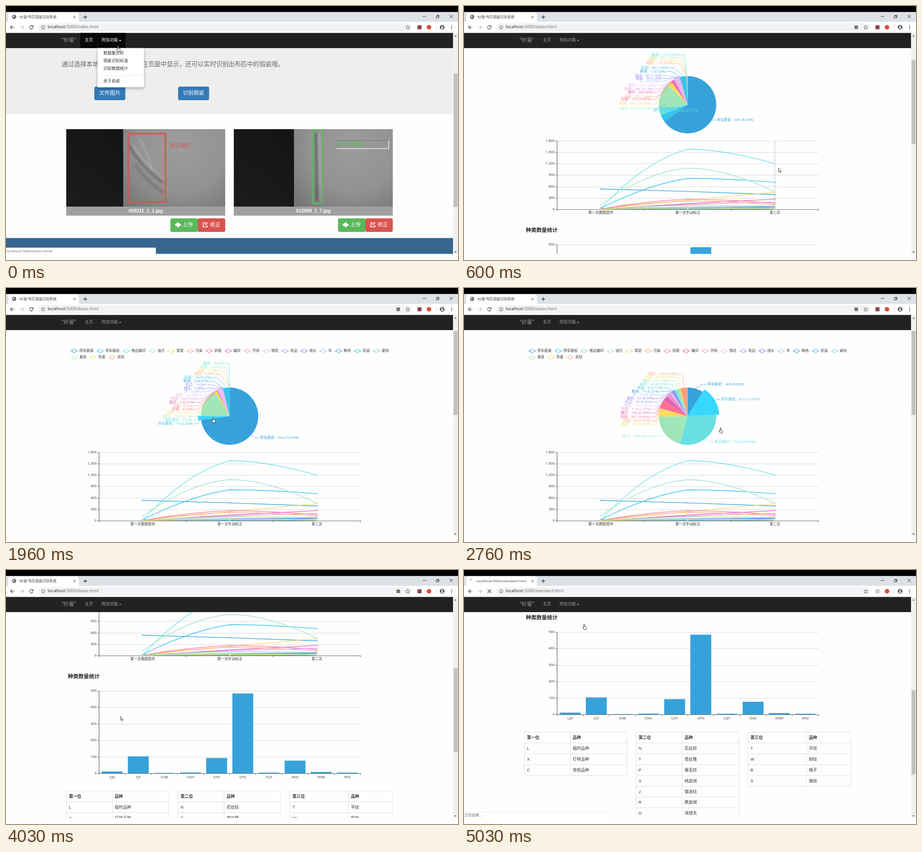
These frames come from a looping animation (998x561 px, 5.06 s). An HTML page with a canvas:

```html
<!DOCTYPE html>
<html lang="zh-CN">
<head>
<meta charset="utf-8">
<style>
html, body { margin: 0; width: 998px; height: 561px; overflow: hidden; background: #fefefe; }
canvas { display: block; }
</style>
</head>
<body>
<canvas id="stage" width="998" height="561"></canvas>
<script>
const g = document.getElementById('stage').getContext('2d');
const LOOP = 5060, K = .65, TAU = Math.PI * 2;
const UI = "'Open Sans','Noto Sans CJK SC',sans-serif";
const ARIAL = "'Liberation Sans','Noto Sans CJK SC',sans-serif";
const BRAND = '“纱鉴”';

// ---------- data ----------
const names = '停车痕紧 停车痕松 卷边皱印 油污 浆斑 污染 折痕 皱印 开纬 错花 毛边 线头 字 断纬 折返 紧纬 紧经 色差 花纹'.split(' ');
const rounds = [
  [534, 17, 0, 118, 9, 0, 0, 2, 4, 22, 0, 0, 0, 3, 24, 0, 0, 0, 0],
  [468, 812, 1583, 1081, 238, 22, 261, 146, 119, 57, 45, 31, 17, 11, 6, 45, 98, 26, 216],
  [385, 710, 1200, 452, 445, 77, 153, 265, 185, 73, 60, 53, 44, 1, 88, 19, 81, 11, 115]];
const palette = '37A2DA 32C5E9 67E0E3 9FE6B8 FFDB5C FF9F7F FB7293 E062AE E690D1 E7BCF3 9D96F5 8378EA 96BFFF'.split(' ');
const color = i => '#' + palette[i % 13];
const lift = i => 'rgb(' + palette[i % 13].match(/../g).map(h => Math.min(255, parseInt(h, 16) * 1.1 | 0)) + ')';
const bars = { CJD: 11, CJT: 103, CNB: 2, CNH: 5, CNT: 93, CPD: 484, CQT: 4, XND: 77, XNW: 8, XPD: 4 };
const tables = [
  [133.5, 234.5, 360, '第一位 品种 L 临时品种 X 打样品种 C 常规品种'],
  [380, 481.5, 607, '第二位 品种 N 尼丝纺 T 塔丝隆 P 春亚纺 S 桃皮绒 J 锦涤纺 R 麂皮绒 D 涤塔夫'],
  [627, 756, 854, '第三位 品种 T 平纹 W 斜纹 B 格子 S 缎纹']];

// ---------- timeline ----------
const pieSteps = [[-1e4, 0], [592.6, 2], [1180, 1], [1420, 0], [2135, 1], [2900, 2]];
const hovers = [[1, 1860, 2070], [1, 2540, 2790], [2, 3230, 3480]];
const scrollKeys = [[430, -65], [480, 0], [510, 0], [560, 65], [920, 65], [1030, 0], [3540, 0], [3660, 65],
  [3740, 130], [3950, 325], [4320, 325], [4450, 455]];
// time, x, y, hand
const mouseKeys = [[0, 248, 95, 1], [90, 240, 106, 1], [260, 240, 106, 1], [300, 260, 120, 0], [530, 690, 285, 0],
  [600, 697, 363, 0], [1060, 700, 400, 0], [1180, 590, 410, 0], [1420, 397, 430, 0], [1600, 330, 400, 0],
  [1860, 446, 300, 1], [1960, 458, 292, 1], [2070, 463, 300, 0], [2135, 490, 365, 0], [2250, 510, 400, 0],
  [2540, 535, 300, 1], [2640, 540, 270, 1], [2760, 567, 315, 1], [2820, 580, 365, 0], [2900, 592, 400, 0],
  [3050, 640, 400, 0], [3230, 545, 335, 1], [3360, 515, 313, 1], [3480, 500, 314, 0], [3760, 300, 330, 0],
  [4030, 255, 328, 0], [4400, 255, 328, 0], [4520, 236, 78, 1], [4600, 240, 85, 1], [4700, 262, 122, 1], [4850, 266, 126, 1]];

const clamp = v => Math.max(0, Math.min(1, v));
const lerp = (a, b, p) => a + (b - a) * p;
const easeOut = p => 1 - (1 - clamp(p)) ** 3;
function track(keys, t) {
  let i = keys.findIndex(k => k[0] > t);
  if (i == 0) return keys[0];
  if (i < 0) return keys[keys.length - 1];
  const a = keys[i - 1], b = keys[i], p = (t - a[0]) / (b[0] - a[0]), e = p * p * (3 - 2 * p);
  return a.map((v, j) => j == 3 ? v : lerp(v, b[j], e));
}

// ---------- drawing helpers ----------
function text(s, x, y, size, fill, align = 'left', style = '', font = UI) {
  g.font = `${style} ${size}px ${font}`;
  g.textAlign = align;
  g.textBaseline = 'middle';
  g.fillStyle = fill;
  g.fillText(s, x, y);
}
function rect(x, y, x2, y2, fill, r = 0) {
  g.fillStyle = fill;
  g.beginPath();
  g.roundRect(x, y, x2 - x, y2 - y, r);
  g.fill();
}
function line(pts, stroke, w = 1) {
  g.strokeStyle = stroke;
  g.lineWidth = w;
  g.beginPath();
  pts.forEach(p => g.lineTo(...p));
  g.stroke();
}
function circle(x, y, r, fill, stroke, w = 1, a = 0, b = TAU) {
  g.beginPath();
  g.arc(x, y, r, a, b);
  if (fill) { g.fillStyle = fill; g.fill(); }
  if (stroke) { g.strokeStyle = stroke; g.lineWidth = w; g.stroke(); }
}
function shape(d, x, y, fill, stroke, w = 1) {
  const p = new Path2D(d);
  g.save();
  g.translate(x, y);
  if (fill) { g.fillStyle = fill; g.fill(p); }
  if (stroke) { g.strokeStyle = stroke; g.lineWidth = w; g.stroke(p); }
  g.restore();
}
function stops(gradient, ...colors) {
  colors.forEach((c, i) => gradient.addColorStop(i / (colors.length - 1), c));
  return gradient;
}

// ---------- pie ----------
const CX = 493.6, CY = 283, R = 97.5 * K, LEG = 15 * K, LH = 12 * K;

// Slice angles plus labels spread apart so that none overlap.
function layout(vals) {
  const sum = vals.reduce((a, b) => a + b);
  let acc = 0;
  const items = vals.map(v => {
    const a0 = acc / sum * TAU, a1 = (acc += v) / sum * TAU, m = (a0 + a1) / 2;
    const d = m > 3.14 ? -1 : 1, sx = Math.sin(m), sy = -Math.cos(m);
    return { a0, a1, d, x1: sx * R, y1: sy * R, x: sx * (R + LEG) + d * (LEG + 5 * K), y: sy * (R + LEG) };
  });
  for (const d of [-1, 1]) spread(items.filter(o => o.d == d).sort((a, b) => a.y - b.y));
  return items;
}
function spread(list) {
  const up = (end, dy) => {
    for (let j = end; j >= 0; j--) {
      list[j].y -= dy;
      if (j > 0 && list[j].y > list[j - 1].y + LH) break;
    }
  };
  const down = (start, dy) => {
    for (let j = start; j < list.length; j++) {
      list[j].y += dy;
      if (j > start && j + 1 < list.length && list[j + 1].y > list[j].y + LH) return up(j, dy / 2);
    }
    up(list.length - 1, dy / 2);
  };
  let last = -1e9;
  list.forEach((o, i) => {
    if (o.y < last) down(i, last - o.y);
    last = o.y + LH;
  });
  let above = 0, below = 1e9;
  for (const o of list) {
    const dy = Math.abs(o.y);
    let dx = dy < R + LEG ? Math.sqrt((R + 2 * LEG) ** 2 - dy * dy) : Math.abs(o.x);
    if (o.y >= 0) below = dx = dx >= below ? below - 10 * K : dx;
    else above = dx = dx <= above ? above + 10 * K : dx;
    o.x = dx * o.d;
  }
}
const layouts = rounds.map(layout);
const sums = rounds.map(v => v.reduce((a, b) => a + b));

function drawPie(t) {
  const n = pieSteps.findLastIndex(s => s[0] <= t), now = pieSteps[n][1];
  const from = layouts[pieSteps[Math.max(0, n - 1)][1]], to = layouts[now];
  const p = easeOut((t - pieSteps[n][0]) / 200), intro = easeOut((t - 320) / 200);
  g.save();
  g.translate(CX, CY);
  to.forEach((o, i) => {
    const mix = k => lerp(from[i][k], o[k], p);
    const h = hovers.find(h => h[0] == i && t >= h[1] && t < h[2] + 60);
    const e = h ? Math.min(easeOut((t - h[1]) / 80), 1 - clamp((t - h[2]) / 60)) : 0;
    g.fillStyle = e > .3 ? lift(i) : color(i);
    g.beginPath();
    g.moveTo(0, 0);
    g.arc(0, 0, R + 6.5 * e, mix('a0') * intro - TAU / 4, mix('a1') * intro - TAU / 4);
    g.fill();
  });
  if (intro > .9) to.forEach((o, i) => {
    const mix = k => lerp(from[i][k], o[k], p), x = mix('x'), y = mix('y');
    const end = x - o.d * 3 * K, v = rounds[now][i];
    line([[mix('x1'), mix('y1')], [end - o.d * LEG, y], [end, y]], color(i), .8);
    text(`${names[i]}：${v} (${+(v / sums[now] * 100).toFixed(2)}%)`, x, y, 7.8, color(i), o.d < 0 ? 'right' : 'left');
  });
  g.restore();
}

// ---------- charts ----------
const X0 = 205.5, X1 = 782.5;
function axes(y0, step, unit, count, labels) {
  for (let i = 0; i <= count; i++) {
    const y = Math.round(y0 - i * step);
    rect(X0, y, X1, y + .8, i ? '#ccc' : '#333');
    rect(X0 - 3.5, y, X0, y + .8, '#333');
    text((i * unit).toLocaleString('en-US'), 200, y, 7.8, '#333', 'right');
  }
  rect(X0 - .5, y0 - count * step, X0 + .4, y0 + 3, '#333');
  const w = (X1 - X0) / labels.length;
  labels.forEach((s, i) => {
    rect(X0 + w * (i + 1) - .5, y0, X0 + w * (i + 1) + .4, y0 + 3.5, '#333');
    text(s, X0 + w * (i + .5), y0 + 8.5, 7.8, '#333', 'center');
  });
}
function drawLines(t, mouse, s) {
  const y0 = 513.7, w = (X1 - X0) / 3;
  axes(y0, 25.1, 300, 6, ['第一次赛题提供', '第一次手动标注', '第二次']);
  const my = mouse[2] + s;
  if (t > 560 && my > 363 && my < y0 && mouse[1] > X0 && mouse[1] < X1) {
    const x = X0 + w * (Math.floor((mouse[1] - X0) / w) + .5);
    line([[x, 363], [x, y0]], '#aab0cc', .9);
  }
  g.save();
  g.beginPath();
  g.rect(X0 - 2, 340, (X1 - X0 + 4) * easeOut((t - 320) / 220), 190);
  g.clip();
  names.forEach((_, i) => {
    const [a, b, c] = rounds.map((v, k) => [X0 + w * (k + .5), y0 - v[i] * 25.1 / 300]);
    const ys = [a[1], b[1], c[1]], lo = Math.min(...ys), hi = Math.max(...ys);
    const la = Math.hypot(b[0] - a[0], b[1] - a[1]), lb = Math.hypot(c[0] - b[0], c[1] - b[1]);
    const ctrl = f => [b[0] + (c[0] - a[0]) * f, Math.max(lo, Math.min(hi, b[1] + (c[1] - a[1]) * f))];
    g.strokeStyle = color(i);
    g.lineWidth = 1.3;
    g.beginPath();
    g.moveTo(...a);
    g.bezierCurveTo(...a, ...ctrl(-.5 * la / (la + lb)), ...b);
    g.bezierCurveTo(...ctrl(.5 * lb / (la + lb)), ...c, ...c);
    g.stroke();
    [a, b, c].forEach(p => circle(...p, 1.4, '#fff', color(i), .9));
  });
  g.restore();
}
function drawLegend() {
  let x = 142.5, y = 139;
  names.forEach((s, i) => {
    if (i == 16) { x = 142.5; y = 153.3; }
    line([[x, y], [x + 16.25, y]], color(i), 1.3);
    circle(x + 8.1, y, 4, '#fff', color(i), 1.1);
    text(s, x + 19.5, y - .5, 7.8, '#333');
    x += 26.3 + s.length * 7.8;
  });
}
function drawBars() {
  text('种类数量统计', 136.5, 561, 11.7, '#222', 'left', 'bold');
  const w = (X1 - X0) / 10;
  axes(774, 36.4, 100, 5, Object.keys(bars));
  Object.values(bars).forEach((v, i) => {
    const x = X0 + w * i + w * .1;
    rect(x, 774 - v * .364, x + w * .8, 774, color(0));
  });
}
function drawTables() {
  const h = 23.9, top = 813;
  for (const [x, mid, end, words] of tables) {
    const cells = words.split(' '), rows = cells.length / 2;
    for (let r = 0; r <= rows; r++) {
      const y = Math.round(top + r * h);
      rect(x - .5, y - .5, end + .5, y + .4, '#ddd');
      if (r < rows) [x, mid].forEach((cx, k) =>
        text(cells[r * 2 + k], cx + 5.5, y + 12, 9.1, '#333', 'left', r ? '' : 'bold', ARIAL));
    }
    [x, mid, end].forEach(v => rect(v - .5, top, v + .4, top + rows * h, '#ddd'));
  }
}

// ---------- index page ----------
const cloud = 'M-4 3C-8 2 -7 -3 -4 -2C-3 -6 3 -6 3 -2C8 -2 7 3 4 3L1.5 3V6H-1.5V3Z';
const pencil = 'M2 -4H-5V5H4V1M-1.5 1.5L5 -4.5';
function button(x, x2, y, s, fill, icon) {
  rect(x, y, x2, y + 30, fill, 4);
  text(s, (x + x2) / 2 + (icon ? 8 : 0), y + 14.5, 11.7, '#fff', 'center');
  if (icon) shape(icon, x + 17, y + 14, icon == cloud ? '#fff' : '', icon == cloud ? '' : '#fff', 1.7);
}
function fabric(x, edge) {
  rect(x, 272, edge, 443, stops(g.createLinearGradient(x, 443, edge, 272), '#1c1c1c', '#141414'));
  const mx = edge + 130;
  rect(edge, 272, x + 351, 443, stops(g.createRadialGradient(mx, 310, 10, mx, 310, 190), '#9b9b9b', '#929292', '#707070'));
  g.save();
  g.setLineDash([2, 1.5]);
  line([[edge, 272], [edge + 1, 443]], '#8a8a8a', 1.2);
  g.restore();
}
function fold(d, x, y, stroke, w) {
  g.save();
  g.filter = 'blur(2.5px)';
  shape(d, x, y, '', stroke, w);
  g.restore();
}
function caption(x, name) {
  rect(x, 443, x + 351, 463, '#a0a0a2');
  text(name, x + 175.5, 453, 10.4, '#fff', 'center', 'bold', ARIAL);
  button(x + 230, x + 291, 469, '上传', '#5cb85c', cloud);
  button(x + 290.5, x + 351, 469, '修正', '#d9534f', pencil);
}
function drawIndex() {
  rect(0, 93, 987, 238.5, '#eee');
  text('通过选择本地的布匹图片，可在页面中显示，还可以实时识别出布匹中的瑕疵哦。', 123, 129.5, 13.65, '#666', 'left', '300');
  button(195, 263.5, 178, '文件图片', '#337ab7');
  button(380, 448.5, 178, '识别瑕疵', '#337ab7');
  fabric(133, 259);
  const crease = 'M0 0C15 30 40 55 74 82';
  fold(crease, 272, 308, '#0004', 5);
  fold(crease, 279, 304, '#fff3', 4);
  fold('M0 0C12 20 30 40 62 62', 286, 350, '#0003', 5);
  fold('M0 0C14 22 24 40 30 75', 292, 290, '#fff2', 6);
  caption(133, '005311_1_1.jpg');
  fabric(503, 636);
  fold('M0 0L3 150', 684, 280, '#0005', 5);
  fold('M0 0L2 150', 692, 280, '#fff3', 5);
  caption(503, '012909_1_7.jpg');
  g.lineWidth = 3;
  g.strokeStyle = '#d9534f';
  g.strokeRect(270, 282, 82, 150.5);
  g.strokeStyle = '#5cb85c';
  g.strokeRect(678, 273.5, 21, 162.5);
  text('卷边皱印', 361, 309, 11.7, '#d9534fdd', 'left', '300');
  line([[728.5, 315], [728.5, 297], [845, 297]], '#777');
  line([[728, 315], [845, 315], [845, 297]], '#eee', 1.6);
  text('停车痕松', 729.5, 306, 15.6, '#5cb85cdd', 'left', '300');
  rect(0, 512.5, 987, 548, '#366690');
}

// ---------- browser ----------
function drawChrome(title, path, index, loading, t) {
  rect(0, 0, 998, 13.5, '#000');
  rect(0, 13.5, 998, 35, '#dee1e6');
  rect(0, 35, 998, 59.5, '#fff');
  rect(5, 14, 161, 36, '#fff', [5, 5, 0, 0]);
  if (loading) circle(18, 24, 4.5, '', '#777', 1.2, Math.PI, Math.PI * 1.5);
  else {
    circle(18, 24, 4.6, '#555b60');
    shape('M-3 -2L0 -3L1 -1L-1 1L-2 3ZM1 1L3 0L2 3Z', 18, 24, '#dfe2e5');
  }
  text(title, 28, 24.5, loading ? 8 : 7.8, '#444');
  const ink = '#444', cross = 'M-2.5 -2.5L2.5 2.5M2.5 -2.5L-2.5 2.5';
  shape(cross, 151, 24.5, '', ink);
  shape('M-4 0H4M0 -4V4', 175, 24.5, '', '#333', 1.3);
  shape('M-4 0H4', 924, 23, '', '#333');
  shape('M-3 -1.5H1.5V3H-3ZM-1.5 -1.5V-3H3V1.5H1.5', 953, 23.5, '', '#333');
  shape('M-3.5 -3.5L3.5 3.5M3.5 -3.5L-3.5 3.5', 983, 23, '', '#333');
  shape('M4.5 0H-4M0 -4L-4 0L0 4', 14, 47, '', ink, 1.2);
  shape('M-4.5 0H4M0 -4L4 0L0 4', 35, 47, '', '#bbb', 1.2);
  if (loading) shape('M-4 -4L4 4M4 -4L-4 4', 56, 47, '', ink, 1.2);
  else {
    circle(56, 47, 3.8, '', ink, 1.2, .3, 5.5);
    shape('M4.5 -4.5V-.5H.5Z', 56, 47, ink);
  }
  rect(71, 38, 897, 56.5, '#f1f3f4', 9);
  circle(82, 47, 3.8, '', '#555', .9);
  shape('M0 -2V-1M0 0V2.2', 82, 47, '', '#555');
  text('localhost', 92, 47, 9.3, '#222');
  text(':5000/' + path, 92 + g.measureText('localhost').width, 47, 9.3, '#666');
  if (!index && !loading) rect(862, 43, 870, 51, '#777', 1);
  shape('M0 -4.5L1.3 -1.5L4.5 -1.2L2 1L2.8 4.2L0 2.5L-2.8 4.2L-2 1L-4.5 -1.2L-1.3 -1.5Z', 887, 47, '', '#555', .9);
  rect(908.5, 42.5, 917.5, 51.5, loading ? '#ccc' : '#8d4650', 1);
  circle(934, 47, 5, '#dd4b36');
  rect(949, 41, 949.8, 53, '#d5d5d5');
  circle(963, 47, 5.3, '#555a5f');
  circle(963, 45.3, 1.7, '#fff');
  circle(963, 50.5, 3, '#fff', '', 1, Math.PI, TAU);
  [-3.3, 0, 3.3].forEach(d => circle(984, 47 + d, 1, ink));
}
function drawNav(index, open, item) {
  rect(0, 59.5, 987, 93, '#222');
  if (index) rect(164, 59.5, 201.5, 93, '#080808');
  if (open) rect(201.5, 59.5, 264, 93, '#080808');
  const gray = '#9d9d9d', c = open ? '#fff' : gray;
  text(BRAND, 123, 76, 11.7, gray);
  text('主页', 174, 76, 9.1, index ? '#fff' : gray);
  text('附加功能', 211, 76, 9.1, c);
  shape('M-2.7 -1.3H2.7L0 1.5Z', 252, 76.5, c);
  if (!open) return;
  g.save();
  g.shadowColor = '#0004';
  g.shadowBlur = 6;
  g.shadowOffsetY = 3;
  rect(202, 93, 305, 179.5, '#fff', [0, 0, 3, 3]);
  g.restore();
  g.strokeStyle = '#ccc';
  g.lineWidth = .7;
  g.strokeRect(202, 93, 103, 86.5);
  if (item >= 0) rect(202.5, 96 + 17 * item, 304.5, 113 + 17 * item, '#f5f5f5');
  rect(202, 152.5, 305, 153.2, '#e5e5e5');
  ['数据集分析', '瑕疵识别标准', '识别数据统计', '关于系统'].forEach((s, i) =>
    text(s, 215, i < 3 ? 104.5 + 17 * i : 167, 9.1, '#333'));
}
function drawScrollbar(y, y2) {
  rect(987, 59.5, 998, 548, '#f1f1f1');
  rect(988.3, y, 997, y2, '#c1c1c1');
  shape('M-2.5 1.5H2.5L0 -1.5Z', 992.5, 66, '#555');
  shape('M-2.5 -1.5H2.5L0 1.5Z', 992.5, 543.5, '#555');
}
function drawStatus(s) {
  rect(0, 534, 331, 548, '#fff', [0, 3, 0, 0]);
  line([[0, 534], [330, 534], [331, 548]], '#e4e4e4', .7);
  text(s, 1, 541.5, 8, '#666');
}
function drawMouse([, x, y, hand]) {
  if (hand) shape('M-1.6 -5.5C-1.6 -6.8 .2 -6.8 .2 -5.5V-1.5L3.2 -.8C4.3 -.5 4.4 .3 4.2 1.4L3.4 5.5H-1.2L-4 1.5C-4.4 .4 -3.2 -.1 -2.4 .8L-1.6 1.7Z',
    x, y, '#fff', '#222', .9);
  else shape('M-2.5 -5V4L-.4 2.2L1 5.2L2.3 4.6L1 1.7H3.6Z', x, y, '#fff', '#222', .8);
}

// ---------- frame ----------
function draw(t) {
  const index = t < 300, loading = t >= 4920;
  const s = track(scrollKeys, t)[1], mouse = track(mouseKeys, t);
  rect(0, 0, 998, 561, '#fefefe');
  g.save();
  g.beginPath();
  g.rect(0, 93, 987, 454.5);
  g.clip();
  if (index) drawIndex();
  else {
    g.translate(0, -s);
    drawLegend();
    drawLines(t, mouse, s);
    drawPie(t);
    drawBars();
    drawTables();
  }
  g.restore();
  const title = loading ? 'localhost:5000/standard.html' : BRAND + '布匹瑕疵识别系统';
  drawChrome(title, loading ? 'standard.html' : index ? 'index.html' : 'datas.html', index, loading, t);
  const late = t >= 4540 && t < 4870, onItem = late && t > 4660;
  drawNav(index, index && t < 270 || late, onItem ? 1 : index && t > 70 ? 0 : -1);
  if (index) drawScrollbar(149, 444);
  else drawScrollbar(95 + s * .3755, 280.5 + s * .3755);
  if (loading) drawStatus('正在连接...');
  else if (index) drawStatus('localhost:5000/' + (t > 70 ? 'datas.html' : 'index.html#'));
  else if (late) drawStatus('localhost:5000/' + (onItem ? 'standard.html' : 'datas.html#'));
  drawMouse(mouse);
}
const start = performance.now();
function tick() {
  draw((performance.now() - start) % LOOP);
  requestAnimationFrame(tick);
}
tick();
</script>
</body>
</html>
```
